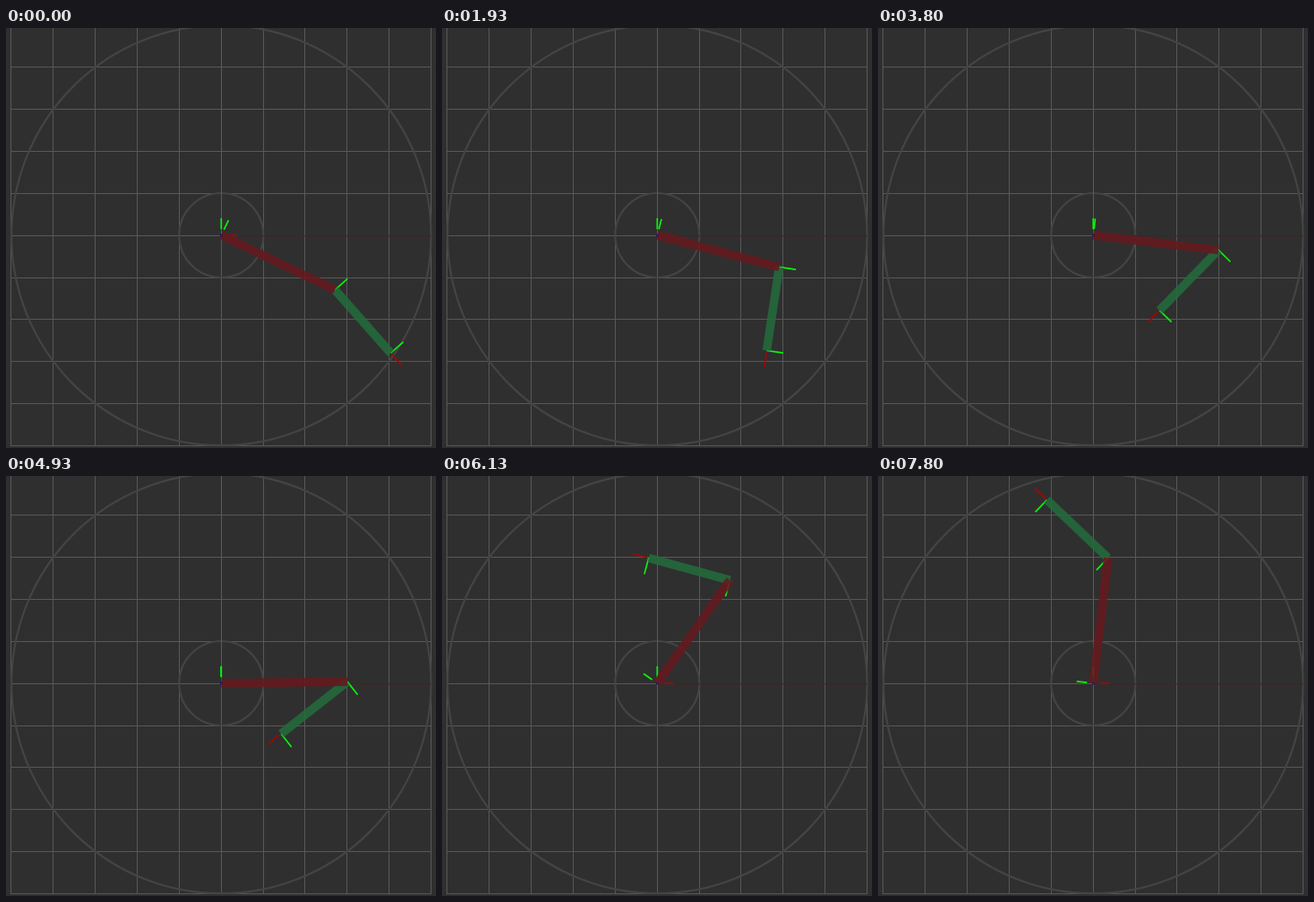
Animation of 480 by 468 pixels, one loop 8 s. Source, as an HTML page:

```html
<!DOCTYPE html>
<html lang="en">
<head>
<meta charset="utf-8">
<title>Two-link arm</title>
<style>
  html, body { margin: 0; width: 100%; height: 100%; overflow: hidden; background: #2f2f2f; }
  svg { display: block; width: 100vw; height: 100vh; }
  .grid { stroke: #585858; shape-rendering: crispEdges; }
  .ring { fill: none; stroke: #444; stroke-width: 2.2; }
  .x { stroke: #b00000; stroke-width: 1.6; }
  .y { stroke: #0df20d; stroke-width: 1.7; }
</style>
</head>
<body>
<svg viewBox="0 0 480 468">
  <rect width="480" height="468" fill="#2f2f2f"/>
  <g id="grid" class="grid"></g>
  <circle class="ring" cx="240.3" cy="231" r="234.2"/>
  <circle class="ring" cx="240.3" cy="231" r="47"/>
  <path d="M240.5 0V231" stroke="#238423" shape-rendering="crispEdges"/>
  <path d="M240 231.5H475" stroke="#6c1016" shape-rendering="crispEdges"/>
  <g transform="translate(240.3 231)">
    <path class="x" d="M7 0H18.7"/>
    <path class="y" d="M0 -7V-19"/>
    <g id="shoulder"><path class="y" d="M0 -7V-18.7"/></g>
    <g id="forearm">
      <path class="y" d="M0 0V-18.7"/>
      <path class="y" d="M94 0V-18.7"/>
      <path class="x" d="M96 0H112.5"/>
      <rect y="-4.8" width="94" height="9.6" fill="#246a3c" opacity=".88"/>
    </g>
    <g id="upper">
      <rect y="-4.8" width="140.7" height="9.6" fill="#661a1e" opacity=".88"/>
    </g>
    <circle r="1.5" fill="#1c1c78"/>
  </g>
</svg>
<script>
  const LOOP = 8000, FRAME = 200 / 3, UPPER = 140.7;
  const el = id => document.getElementById(id);

  // Absolute link angles in degrees, counter-clockwise from the x axis
  const poses = [[-25.6, -48.5], [-6.7, -134.4], [83.3, -223.5]];
  const starts = [833, 4833];

  let lines = '';
  for (let i = -5; i <= 5; i++) {
    const x = Math.floor(240.2 + 46.85 * i) + 0.5;
    const y = Math.floor(231.2 + 46.85 * i) + 0.5;
    lines += `M${x} 0V466M5 ${y}H475`;
  }
  el('grid').innerHTML = `<path d="${lines}"/>`;

  // The arm moves for two seconds, updated ten times a second
  function progress(t, start) {
    if (t < start) return 0;
    return Math.min(1, 0.033 + 0.05 * Math.floor((t - start) / 100));
  }

  function draw(time) {
    const t = Math.floor((time % LOOP + 3.4) / FRAME) * FRAME;
    const u = starts.map(s => progress(t, s));
    const [a, b] = [0, 1].map(j =>
      poses[0][j] + u[0] * (poses[1][j] - poses[0][j]) + u[1] * (poses[2][j] - poses[1][j]));
    const rad = a * Math.PI / 180;
    const x = UPPER * Math.cos(rad), y = -UPPER * Math.sin(rad);
    el('shoulder').setAttribute('transform', `rotate(${-a})`);
    el('upper').setAttribute('transform', `rotate(${-a})`);
    el('forearm').setAttribute('transform', `translate(${x} ${y}) rotate(${-b})`);
  }

  const begin = performance.now();
  function tick() {
    draw(performance.now() - begin);
    requestAnimationFrame(tick);
  }
  tick();
</script>
</body>
</html>
```
